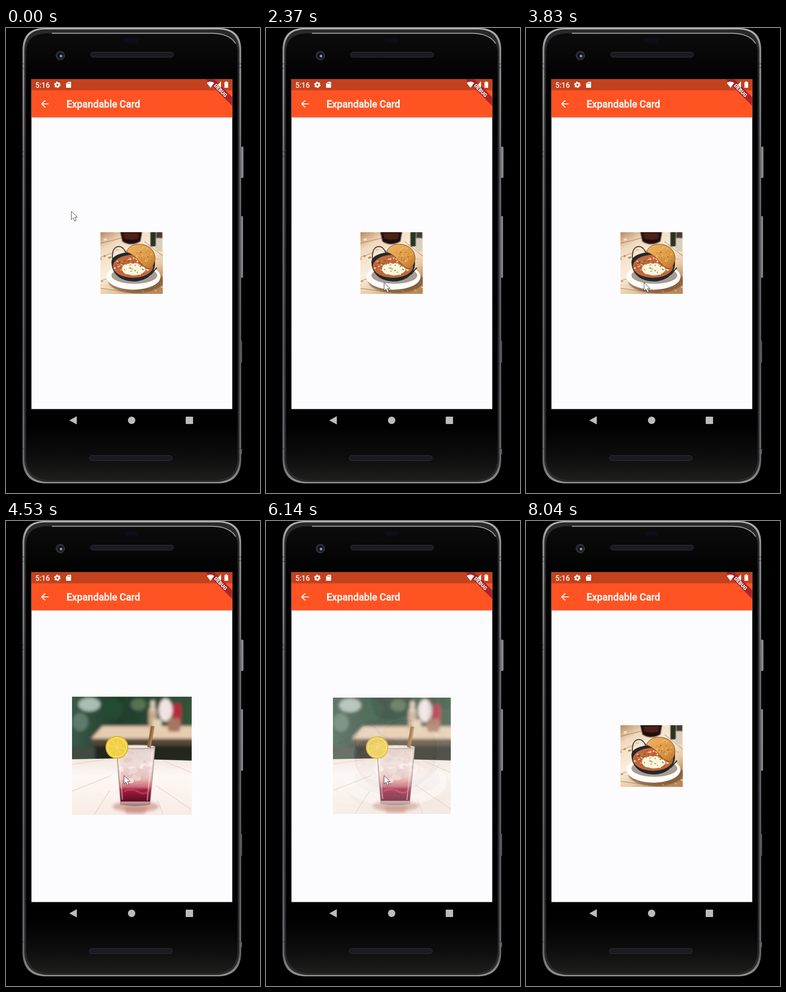
Recreate the animation shown at these times as an HTML page. Size 554 by 1011 pixels, loop 8.1 s.

```html
<!DOCTYPE html>
<html lang="en">
<head>
<meta charset="utf-8">
<title>Expandable Card</title>
<style>
html, body { margin: 0; width: 100%; height: 100%; overflow: hidden; background: #000; }
svg { display: block; width: 554px; height: 1011px; }
text { font-family: Roboto, sans-serif; fill: #fff; }
</style>
</head>
<body>
<svg viewBox="0 0 554 1011" xmlns="http://www.w3.org/2000/svg">
  <defs>
    <linearGradient id="rim" x1="0" y1="0" x2="0" y2="1">
      <stop offset="0" stop-color="#b4b4b4"/><stop offset=".05" stop-color="#8c8c90"/>
      <stop offset=".3" stop-color="#66666c"/><stop offset=".7" stop-color="#58585e"/>
      <stop offset=".95" stop-color="#66666a"/><stop offset="1" stop-color="#929292"/>
    </linearGradient>
    <linearGradient id="glass" x1="0" y1="0" x2="0" y2="1">
      <stop offset="0" stop-color="#0c0c0d"/><stop offset=".1" stop-color="#020202"/>
      <stop offset=".88" stop-color="#010101"/><stop offset=".95" stop-color="#0e0e0e"/>
      <stop offset="1" stop-color="#1e1e1d"/>
    </linearGradient>
    <linearGradient id="shade" x1="0" y1="0" x2="0" y2="1">
      <stop offset="0" stop-color="#c4b8b8"/><stop offset="1" stop-color="#fcfcfe" stop-opacity="0"/>
    </linearGradient>
    <linearGradient id="wood" x1="0" y1="0" x2=".6" y2="1">
      <stop offset="0" stop-color="#b98a62"/><stop offset=".22" stop-color="#f0d9bd"/>
      <stop offset=".55" stop-color="#fbeedd"/><stop offset=".8" stop-color="#e6c9a4"/>
      <stop offset="1" stop-color="#b98858"/>
    </linearGradient>
    <linearGradient id="crust" x1="0" y1="0" x2="1" y2="1">
      <stop offset="0" stop-color="#f0b562"/><stop offset=".6" stop-color="#dd9a45"/>
      <stop offset="1" stop-color="#b9702a"/>
    </linearGradient>
    <linearGradient id="leaf" x1="0" y1="0" x2="1" y2="0">
      <stop offset="0" stop-color="#3d5a4c"/><stop offset=".4" stop-color="#1f3d2b"/>
      <stop offset="1" stop-color="#36543b"/>
    </linearGradient>
    <linearGradient id="table" x1="0" y1="0" x2="0" y2="1">
      <stop offset="0" stop-color="#f3e6df"/><stop offset=".3" stop-color="#fdf8f5"/>
      <stop offset="1" stop-color="#f7ece4"/>
    </linearGradient>
    <linearGradient id="drink" x1="0" y1="0" x2="0" y2="1">
      <stop offset="0" stop-color="#ddd0ca"/><stop offset=".3" stop-color="#eedcd8"/>
      <stop offset=".55" stop-color="#e6b7b5"/><stop offset=".68" stop-color="#cf6d7b"/>
      <stop offset=".73" stop-color="#a41f42"/><stop offset=".92" stop-color="#5f0b22"/>
      <stop offset=".94" stop-color="#c9a3a0"/><stop offset="1" stop-color="#8d7470"/>
    </linearGradient>
    <filter id="soft" x="-10%" y="-10%" width="120%" height="120%"><feGaussianBlur stdDeviation="3.2"/></filter>
    <filter id="haze" x="-20%" y="-20%" width="140%" height="140%"><feGaussianBlur stdDeviation="1.2"/></filter>
    <clipPath id="foodBox"><rect width="136" height="134"/></clipPath>
    <clipPath id="drinkBox"><rect width="261" height="257"/></clipPath>
    <clipPath id="glassBox"><path d="M97 108 H181 L170 234 Q138 240 106 234 Z"/></clipPath>
  </defs>

  <rect width="554" height="1011"/>

  <!-- phone body -->
  <g fill="#85858c">
    <rect x="511" y="258" width="7" height="68" rx="2"/>
    <rect x="510" y="409" width="7" height="134" rx="2"/>
    <rect x="511" y="680" width="4" height="48" rx="1" fill="#505056"/>
    <rect x="511" y="915" width="4" height="12" rx="1" fill="#505056"/>
  </g>
  <path d="M82 0 H466 Q512 1 513 46 V940 Q511 989 463 990 H86 Q38 989 36 940 V46 Q37 1 82 0 Z" fill="url(#rim)"/>
  <path d="M84 3 H464 Q508 4 509 48 V938 Q507 984 462 987 H88 Q42 984 40 938 V48 Q41 4 84 3 Z" fill="#29292c"/>
  <path d="M88 11 H462 Q504 12 506 52 V936 Q504 980 460 984 H92 Q45 980 43 936 V52 Q44 12 88 11 Z" fill="url(#glass)" stroke="#303034"/>
  <path d="M100 11.500 H450 Q488 12 501 34" fill="none" stroke="#a8a8a8" stroke-width="1.800"/>
  <path d="M36 78 h6 m-6 10 h6 M36 269 h6 m-6 10 h6 M507 78 h6 m-6 8 h6 M36 915 h5 M508 915 h5" stroke="#2a2a2e"/>
  <g fill="#1a1a22" stroke="#32323a">
    <rect x="184.500" y="52.500" width="181" height="11" rx="5.500"/>
    <rect x="181.500" y="929.500" width="181" height="11" rx="5.500"/>
  </g>
  <rect x="259" y="22" width="30" height="10" rx="4" fill="#0d0d1c"/>
  <circle cx="118.500" cy="60" r="9.500" fill="#28282b" stroke="#424245"/>
  <circle cx="119" cy="60" r="6" fill="#0c101d"/>
  <circle cx="120" cy="61" r="3" fill="#8291b0"/>

  <!-- app -->
  <rect x="55.500" y="111" width="438" height="717.500" fill="#fcfcfe"/>
  <rect x="55.500" y="194" width="438" height="4" fill="url(#shade)"/>
  <rect x="55.500" y="135" width="438" height="59" fill="#ff5323"/>
  <rect x="55.500" y="111" width="438" height="24.500" fill="#c4411e"/>
  <path d="M435 111 H454 L493.500 150.500 V169.500 Z" fill="#a0202a" fill-opacity=".88"/>
  <text x="64" y="129.500" font-size="16" font-weight="500">5:16</text>
  <g fill="#fff">
    <circle cx="112" cy="123.500" r="4" fill="none" stroke="#fff" stroke-width="3.600"/>
    <circle cx="112" cy="123.500" r="6" fill="none" stroke="#fff" stroke-width="2" stroke-dasharray="3.140 3.140"/>
    <path d="M135 117 h6 q1 0 1 1 v11 q0 1 -1 1 h-9 q-1 0 -1 -1 v-8 z"/>
    <path d="M134.500 119 v3 m2.300 -3 v3 m2.300 -3 v3" stroke="#c4411e"/>
    <path d="M438 119.500 Q446 113.500 454 119.500 L446 130 Z"/>
    <path d="M469 116 V130 H456 Z"/>
    <path d="M479 116 h3 v1.500 h2.500 v12.500 h-8 v-12.500 h2.500 z"/>
  </g>
  <text transform="translate(468 136) rotate(45)" y="3.600" font-size="11" font-weight="900" text-anchor="middle" stroke="#8d2428" stroke-width="1.500" paint-order="stroke">DEBUG</text>
  <path d="M93.500 165 H78.500 M85.500 157.500 L78 165 L85.500 172.500" fill="none" stroke="#fff" stroke-width="2.200"/>
  <text x="132" y="173" font-size="21.300" font-weight="500" stroke="#fff" stroke-width=".4">Expandable Card</text>
  <g fill="#bcbcbc">
    <path d="M138 853 L154.500 844 V862 Z"/>
    <circle cx="274" cy="853" r="8"/>
    <rect x="392" y="845" width="16" height="16" rx="1"/>
  </g>

  <!-- card -->
  <g id="bowl"><g clip-path="url(#foodBox)">
    <rect width="136" height="134" fill="url(#wood)"/>
    <path d="M0 24 L50 12 M0 55 L30 43 M0 106 L24 98 M0 122 Q60 130 100 134 M96 20 L136 52 M114 108 L136 98" stroke="#96683f" stroke-width="1.300" opacity=".6" fill="none"/>
    <g id="grain"></g>
    <g filter="url(#haze)">
      <path d="M43 -2 H91 L87 20 Q66 32 48 20 Z" fill="#24110b"/>
      <path d="M50 2 H84 L82 14 Q66 19 52 13 Z" fill="#4c2414"/>
      <rect x="109" y="-2" width="12" height="33" rx="2" fill="#2a3022"/>
      <rect x="122" y="-2" width="13" height="16" fill="#453d30"/>
      <rect x="121" y="13" width="14" height="29" rx="3" fill="#d9cdbb"/>
      <ellipse cx="77" cy="106" rx="60" ry="26" fill="#6f4d31" opacity=".65"/>
    </g>
    <ellipse cx="72" cy="97" rx="59" ry="28" fill="#fffdfa"/>
    <ellipse cx="74" cy="94" rx="50" ry="18" fill="#a89d93"/>
    <path d="M28 66 C22 43 30 31 41 31 Q51 32 57 48" fill="none" stroke="#34363a" stroke-width="2"/>
    <path d="M24 64 C25 36 118 36 119 66 C120 92 98 107 72 107 C46 107 24 92 24 64 Z" fill="#24282c"/>
    <path d="M110 92 L123 77" stroke="#2b2e31" stroke-width="2.500"/>
    <ellipse cx="71" cy="74" rx="44" ry="25" fill="#c0683c"/>
    <g id="stew"></g>
    <path d="M47 80 Q48 67 64 69 Q80 64 90 74 Q105 79 92 89 Q77 97 62 92 Q47 90 47 80 Z" fill="#fdf6dc"/>
    <g id="herbs"></g>
    <path d="M57 43 C63 22 97 21 112 37 C123 51 121 70 107 80 Q95 76 84 63 Q74 49 57 43 Z" fill="url(#crust)" stroke="#6d3813"/>
    <g id="crumbs"></g>
  </g></g>

  <g id="glassCard"><g clip-path="url(#drinkBox)">
    <rect width="261" height="257" fill="#2a3e31"/>
    <g filter="url(#soft)">
      <rect x="-9" y="-9" width="280" height="160" fill="url(#leaf)"/>
      <ellipse cx="38" cy="17" rx="24" ry="15" fill="#a9bdb3"/>
      <ellipse cx="18" cy="55" rx="17" ry="20" fill="#5d7c6b"/>
      <ellipse cx="88" cy="27" rx="24" ry="22" fill="#244c33"/>
      <ellipse cx="145" cy="17" rx="17" ry="13" fill="#547253"/>
      <path d="M66 64 H270 V91 H42 Z" fill="#e6ccb0"/>
      <path d="M42 91 H270 V106 H45 Z" fill="#554638"/>
      <path d="M40 106 H270 V140 H50 Z" fill="#22251f"/>
      <path d="M-5 108 H50 V140 H-5 Z" fill="#3f4c42"/>
      <rect x="167" y="23" width="18" height="51" rx="7" fill="#c4a98e"/>
      <rect x="171" y="8" width="10" height="25" rx="4" fill="#d8cab5"/>
      <rect x="176" y="49" width="19" height="27" rx="4" fill="#e5d3b9"/>
      <ellipse cx="204" cy="29" rx="15" ry="25" fill="#f0e3e0"/>
      <rect x="219" y="14" width="19" height="54" rx="8" fill="#b52b3d"/>
      <rect x="209" y="47" width="27" height="29" rx="5" fill="#a67660"/>
    </g>
    <path d="M-2 136 L100 134 L263 139 V259 H-2 Z" fill="url(#table)"/>
    <path d="M0 147 L70 137 M0 205 L85 172 M48 257 L82 205 M198 139 L261 165 M183 193 L261 246 M199 257 L187 226" stroke="#e4d4c7" stroke-width="1.500" fill="none"/>
    <g filter="url(#soft)">
      <ellipse cx="139" cy="239" rx="51" ry="12" fill="#c99184" opacity=".65"/>
      <path d="M112 239 H167 L158 255 H119 Z" fill="#bf8274" opacity=".55"/>
    </g>
    <path d="M97 108 H181 L170 234 Q138 240 106 234 Z" fill="url(#drink)"/>
    <g clip-path="url(#glassBox)"><g id="ice"></g>
      <path d="M175 117 L164 226 M102 120 L110 224" stroke="#fff" stroke-width="3" opacity=".4"/>
      <path d="M113 206 Q130 198 145 207 T170 201" fill="none" stroke="#d2546e" stroke-width="4" opacity=".5"/>
    </g>
    <ellipse cx="139" cy="109" rx="42" ry="4" fill="#eee6df" stroke="#9f9589" stroke-width="1.500"/>
    <path d="M97 109 L106 234 Q138 241 170 234 L181 109" fill="none" stroke="#a78a84" stroke-width="1.500"/>
    <path d="M176 64 L168 110" stroke="#93643d" stroke-width="8"/>
    <path d="M178 66 L170 109" stroke="#c28c59" stroke-width="2"/>
    <circle cx="98" cy="110" r="25" fill="#e2ba20"/>
    <circle cx="98" cy="110" r="22" fill="#f7e69a"/>
    <circle cx="98" cy="110" r="20" fill="#f0d144"/>
    <g id="wedges" stroke="#f3df78"></g>
  </g></g>

  <path id="pointer" d="M.5 .5 V18.500 L4.700 14.800 L7.700 21.700 L11 20.300 L8 13.500 H13.800 Z" fill="#fff" stroke="#3a3a3a"/>
</svg>
<script>
const LOOP = 8100, FADE = 400;
const TAPS = [2570, 3300, 4130, 4970, 5830, 6668];
const SMALL = [206, 444, 136, 134], LARGE = [144, 382, 261, 257];
// time, x, y, jump
const PATH = [
  [0, 142, 398], [30, 142, 398], [1060, 273, 514],
  [1430, 310, 586, 1], [1460, 346, 657, 1], [1730, 346, 657],
  [2370, 257, 553], [6800, 257, 553], [6840, 258, 548], [7460, 562, 440]
];
const $ = id => document.getElementById(id);
const mix = (a, b, k) => a + (b - a) * k;
const clamp = v => Math.min(1, Math.max(0, v));
const smooth = k => k * k * (3 - 2 * k);

function seeded(seed) {
  return () => (seed = (seed * 16807) % 2147483647) / 2147483647;
}

function scatter(id, count, cx, cy, rx, ry, size, colors, seed) {
  const rnd = seeded(seed);
  let out = '';
  for (let i = 0; i < count; i++) {
    const a = rnd() * Math.PI * 2, d = Math.sqrt(rnd());
    const x = cx + Math.cos(a) * d * rx, y = cy + Math.sin(a) * d * ry;
    const w = size * (.4 + rnd()), h = size * (.3 + rnd() * .6);
    out += `<ellipse cx="${x.toFixed(1)}" cy="${y.toFixed(1)}" rx="${w.toFixed(1)}" ry="${h.toFixed(1)}"
      fill="${colors[i % colors.length]}" opacity=".8" transform="rotate(${(rnd() * 90 - 45).toFixed()} ${x.toFixed(1)} ${y.toFixed(1)})"/>`;
  }
  $(id).innerHTML = out;
}

scatter('grain', 60, 68, 72, 90, 80, 3, ['#d9b78e', '#fff4e4', '#a97a4e', '#f8e6cd'], 51);
scatter('stew', 85, 69, 75, 39, 20, 2.6, ['#d2492f', '#fbe9c6', '#a3301f', '#e59a5c', '#fff3d6'], 17);
scatter('herbs', 30, 66, 72, 33, 18, 2.2, ['#4e8a35', '#73ad4d', '#cf5635'], 83);
scatter('crumbs', 40, 96, 48, 18, 16, 1.5, ['#f5cb80', '#a05c24', '#fbdc9c', '#c47833'], 29);
scatter('ice', 24, 139, 146, 36, 40, 8, ['#f7eeeb', '#eed9d6', '#e5cbc7'], 97);

$('wedges').innerHTML = Array.from({ length: 8 }, (_, i) => {
  const a = i * Math.PI / 4 + .2;
  return `<path d="M98 110 L${98 + 19 * Math.cos(a)} ${110 + 19 * Math.sin(a)}"/>`;
}).join('');

// cubic-bezier(.25, .1, .25, 1)
function ease(x) {
  const bez = (a, b, u) => 3 * a * u * (1 - u) ** 2 + 3 * b * u * u * (1 - u) + u ** 3;
  let lo = 0, hi = 1;
  for (let i = 0; i < 20; i++) {
    const u = (lo + hi) / 2;
    if (bez(.25, .25, u) < x) lo = u; else hi = u;
  }
  return bez(.1, 1, lo);
}

function pointerAt(t) {
  const i = PATH.findIndex(p => p[0] > t);
  if (i < 0) return null;
  const a = PATH[i - 1], b = PATH[i];
  const k = b[3] ? 0 : smooth((t - a[0]) / (b[0] - a[0]));
  return [mix(a[1], b[1], k), mix(a[2], b[2], k)];
}

function place(id, box, base, opacity) {
  const el = $(id);
  el.setAttribute('transform', `translate(${box[0]} ${box[1]}) scale(${box[2] / base[2]} ${box[3] / base[3]})`);
  el.setAttribute('opacity', opacity);
}

function draw(t) {
  const n = TAPS.filter(s => s <= t).length;
  const p = n ? clamp((t - TAPS[n - 1]) / FADE) : 1;
  const opening = n % 2 === 1;
  const open = opening ? ease(p) : 1 - ease(p);
  const fade = opening ? p : 1 - p;
  const box = SMALL.map((v, i) => mix(v, LARGE[i], open));
  place('bowl', box, SMALL, 1 - fade);
  place('glassCard', box, LARGE, fade);
  const tip = pointerAt(t);
  $('pointer').setAttribute('visibility', tip ? 'visible' : 'hidden');
  if (tip) $('pointer').setAttribute('transform', `translate(${tip[0]} ${tip[1]})`);
}

let start;
function tick(now) {
  start ??= now;
  draw((now - start) % LOOP);
  requestAnimationFrame(tick);
}
draw(0);
requestAnimationFrame(tick);
</script>
</body>
</html>
```
